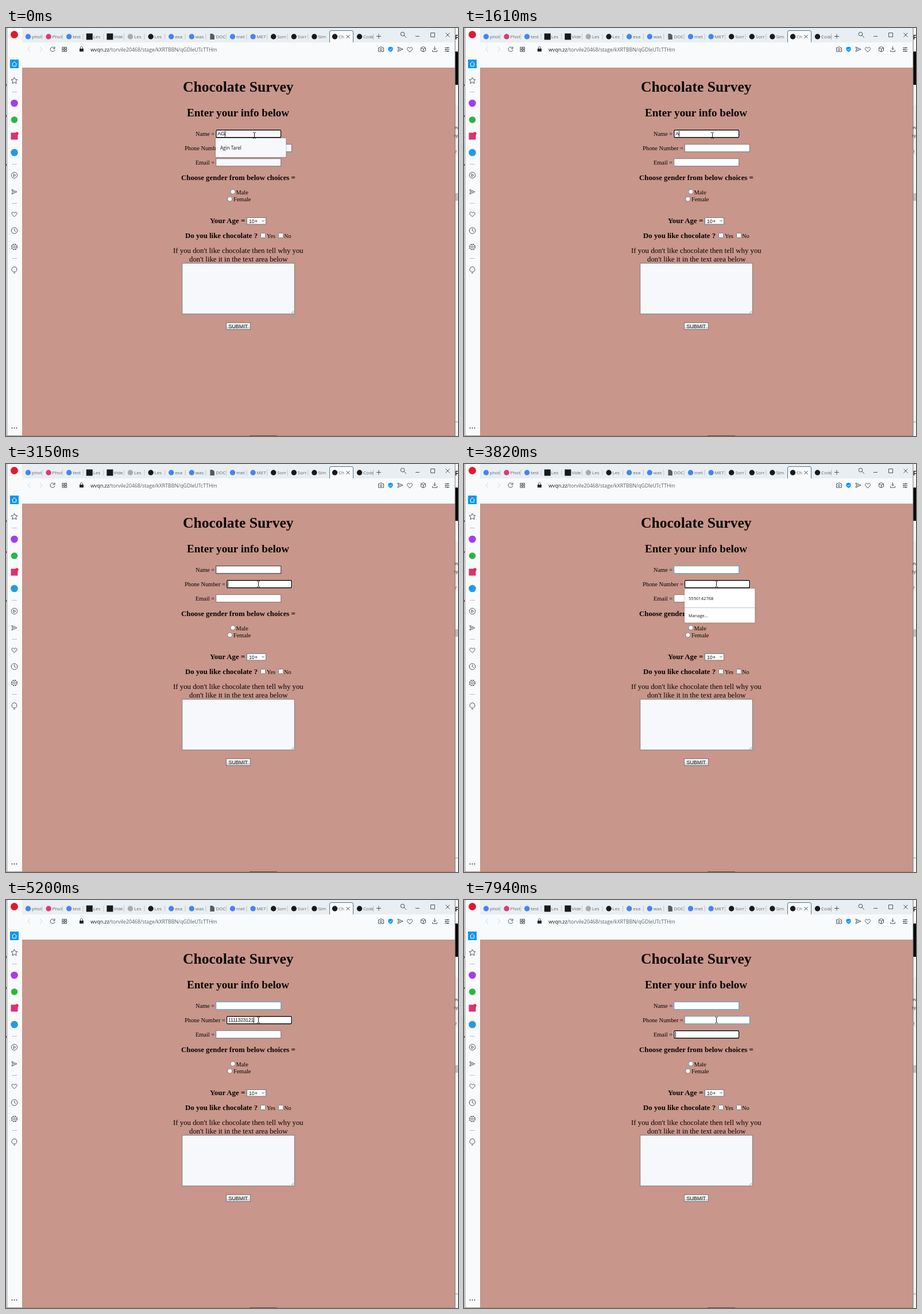
Recreate the animation shown at these times as an HTML page. Size 787x711 px, loop 8000 ms.

```html
<!DOCTYPE html>
<html lang="en">
<head>
<meta charset="utf-8">
<title>Chocolate Survey</title>
<style>
html, body { margin: 0; width: 100%; height: 100%; overflow: hidden; background: #fff; }
svg { display: block; }
text { white-space: pre; }
.serif { font-family: "Liberation Serif", serif; fill: #080404; }
.sans { font-family: "Liberation Sans", sans-serif; fill: #111; }
.ui { font-family: "Open Sans", sans-serif; fill: #181818; }
.line { fill: none; stroke: #4c5258; stroke-width: 1; }
.paper { fill: var(--paper); }
.popup { filter: drop-shadow(0 .5px 1px #0006); }
</style>
</head>
<body>
<svg id="stage" width="787" height="711" viewBox="0 0 787 711"></svg>
<script>
const stage = document.getElementById('stage');

const rect = (x, y, w, h, fill, more = '') =>
  `<rect x="${x}" y="${y}" width="${w}" height="${h}" fill="${fill}" ${more}/>`;
const dot = (x, y, r, fill, more = '') =>
  `<circle cx="${x}" cy="${y}" r="${r}" fill="${fill}" ${more}/>`;
const line = (d, more = '') => `<path class="line" d="${d}" ${more}/>`;
const text = (cls, size, x, y, str, more = '') =>
  `<text class="${cls}" font-size="${size}" x="${x}" y="${y}" ${more}>${str}</text>`;
const at = (x, y, body) => `<g transform="translate(${x} ${y})">${body}</g>`;

const heart = line('M0 4.5L-4 .3C-6 -3 -2 -5.5 0 -2.2C2 -5.5 6 -3 4 .3Z');
const send = line('M-4 -4L5 0L-4 4L-2.5 0ZM-2.5 0H1');

const fileIcon = (x, y) =>
  `<path d="M${x - 3.5} ${y - 5}h4.5l3 3v7h-7.5z" fill="#555b61"/>`;

function tabs() {
  const blue = '#4285f4', pink = '#d93a7c', black = '#17191b';
  const list = [
    ['phot', blue], ['Phot', pink], ['test', blue], ['Les', black, 1], ['Vide', black, 1],
    ['Les', '#aaa'], ['Les', black], ['exa', blue], ['was', blue], ['DOC', 0],
    ['met', blue], ['MET', blue], ['Sorr', black], ['Sorr', black], ['Sim', black],
    ['Ch', black], ['Code', black]
  ];
  let out = rect(28, 0, 753, 25, '#e9eef2') +
    '<path d="M563.5 25V7q0-2.5 2.5-2.5h36q2.5 0 2.5 2.5v18" fill="#f8fafc" stroke="#55748a"/>';
  list.forEach(([label, color, square], i) => {
    const x = i < 16 ? 38.5 + i * 35.6 : 615.5;
    const room = i == 15 ? 11 : 17;
    out += color === 0 ? fileIcon(x, 15)
      : square ? rect(x - 5.5, 9.5, 11, 11, color) : dot(x, 15, 4.7, color);
    out += `<svg x="${x + 6.5}" y="5" width="${room}" height="20">` +
      text('ui', 8, 0, 13, label, 'style="fill:#61686e"') + '</svg>';
    if (i < 14) out += line(`M${x + 24.5} 10V20`, 'style="stroke:#aeb6bc;stroke-width:.7"');
  });
  return out + line('M592.5 12l6 6m0-6l-6 6M645 14.5h8m-4-4v8') +
    line('M639.5 10v10', 'style="stroke:#aeb6bc"');
}

function chrome() {
  let out = rect(0, 0, 787, 711, '#fff') + rect(1.5, 0, 780.5, 711, '#f8fafc') + tabs();
  // window buttons
  out += line('M713 14.5h7M739.5 8.5h7v7h-7zM765.5 8.5l7 7m0-7l-7 7M693 13l4 4') +
    dot(690.5, 10.5, 3.3, 'none', 'class="line"') + dot(14.5, 11.5, 6.5, '#e5182d');
  // address bar
  out += line('M42 33l-4 4l4 4M59 33l4 4l-4 4', 'style="stroke:#cdd2d6"') +
    line('M84.5 35A4 4 0 1 0 85 38M85 32.5V36H81.5');
  for (const x of [98, 102.5]) for (const y of [33.5, 38])
    out += rect(x, y, 3, 3, 'none', 'class="line"');
  out += rect(128, 36, 7, 5, '#25282b') + line('M129.5 36v-2q2-3.5 4 0v2') +
    text('ui', 8.78, 147.3, 40.5,
      'wvqn.zz<tspan fill="#5a6066">/torvile20468/stage/kXRTBBN/qGDleUTcTTHm</tspan>');
  out += line('M648.5 34.5h2l1-1.5h3l1 1.5h2v6.5h-9z') + dot(653, 37.5, 1.8, 'none', 'class="line"') +
    '<path d="M665.5 34l4-1.5l4 1.5v4q-1 2.5-4 4q-3-1.5-4-4z" fill="#0a95f5"/>' +
    line('M667.5 37l1.7 1.7l2.8-3', 'style="stroke:#fff"') + at(686, 37, send) + at(703, 37.5, heart) +
    line('M726.5 32.5l4 2v5l-4 2l-4-2v-5zM722.5 34.5l4 2l4-2M726.5 36.5v5') +
    line('M746.5 32v6m-2.5-2.5l2.5 2.5l2.5-2.5M742.5 38.5v2.5h8v-2.5') +
    line('M764 34.5h8M764 37.5h8M764 40.5h8M769 33v3M766 36v3M769 39v3');
  // side bar
  out += rect(7, 55, 15, 15, '#0a95f5') +
    line('M10.5 62.5l4-4l4 4M11.5 62v4.5h6V62', 'style="stroke:#fff"') +
    line('M14.5 86l1.7 3.6l3.8.4l-2.8 2.6l.8 4l-3.5-2l-3.5 2l.8-4L9 90l3.8-.4z');
  for (const y of [111, 237, 305, 401])
    out += line(`M10 ${y}.5h9`, 'style="stroke:#b9c0c6"');
  out += dot(14.5, 131, 6.3, '#a33cf5') + dot(14.5, 160, 5.8, '#27b83f') +
    rect(8.5, 182.5, 12, 12, '#dc3176') + dot(19, 184, 2.7, '#fa2638') + dot(14.5, 217, 6.3, '#249ae8');
  out += dot(14.5, 256.5, 5.2, 'none', 'class="line"') + line('M13 254l4 2.5l-4 2.5z') +
    at(14, 285.5, send) + at(14.5, 324.5, heart) +
    dot(14.5, 353, 5.3, 'none', 'class="line"') + line('M14.5 349.5V353l2.5 2') +
    dot(14.5, 381.5, 1.8, 'none', 'class="line"') +
    dot(14.5, 381.5, 4.6, 'none', 'class="line" stroke-dasharray="2.4 1.2" style="stroke-width:1.8"') +
    line('M12.5 425q-3-2-2.5-5q1.2-4 4.5-4t4.5 4q.5 3-2.5 5zM13 427h3');
  for (const x of [10.5, 14.5, 18.5]) out += dot(x, 697, .9, '#333');
  return out;
}

function backdrop() {
  return rect(782, 0, 5, 711, '#f8f9fa') + rect(782, 41, 5, 58, '#050505') +
    rect(782, 134, 5, 88, '#eceef0') + rect(782, 288, 5, 13, '#bfc2c5') +
    text('sans', 10, 782, 20, 'Fe', 'font-weight="bold"') +
    text('ui', 7, 781, 176, 'ev') + text('ui', 7, 780, 190, 'sy') + text('ui', 7, 782, 218, '/') +
    rect(782, 686, 5, 1, '#999') + rect(1, 710, 781, 1, '#a58a84') + rect(424, 710, 48, 1, '#554845') +
    line('M1.5 0V711M782 0V711', 'style="stroke:#777"') +
    [98, 152, 237].map(y => rect(0, y, 1, 3, '#666')).join('');
}

function form() {
  const label = (x, y, str) => text('serif', 10.35, x, y, str);
  const bold = (size, x, y, str) => text('serif', size, x, y, str, 'font-weight="bold"');
  const box = (x, y, w, h, fill, more = '') =>
    rect(x, y, w, h, fill, 'stroke="#707078" stroke-width=".9" ' + more);
  return rect(28, 69, 754, 642, '#c8968a') +
    bold(25.6, 308, 111, 'Chocolate Survey') + bold(19.1, 315, 154, 'Enter your info below') +
    label(330, 188, 'Name =') + label(311, 212.5, 'Phone Number =') + label(330, 237.5, 'Email =') +
    bold(12.84, 305, 264.5, 'Choose gender from below choices =') +
    dot(395, 285.3, 4, '#fff', 'stroke="#707078" stroke-width=".8"') + label(400.5, 289.5, 'Male') +
    dot(389.8, 298, 4, '#fff', 'stroke="#707078" stroke-width=".8"') + label(396, 302, 'Female') +
    bold(12.84, 355, 340, 'Your Age =') + box(419.5, 330.5, 33, 11.5, '#fff') +
    text('sans', 8.75, 423, 339.5, '10+') + line('M445.5 335l2 2l2-2') +
    bold(12.84, 312, 366, 'Do you like chocolate ?') +
    box(443.5, 357.5, 8, 8, '#fff', 'rx="1"') + label(454, 366, 'Yes') +
    box(474.5, 357.5, 8, 8, '#fff', 'rx="1"') + label(484, 366, 'No') +
    text('serif', 12.84, 291, 392, "If you don't like chocolate then tell why you") +
    text('serif', 12.84, 319, 407, "don't like it in the text area below") +
    box(306.8, 410, 195.5, 88.2, '#f7f8fb') + line('M497 497l4-4M499.5 497l1.5-1.5', 'style="stroke:#999"') +
    box(383.5, 513.5, 42, 12, '#efeff0') + rect(384, 521, 41, 4, '#d4d5d8') +
    text('sans', 8.9, 387.5, 522.7, 'SUBMIT');
}

const field = (id, x, y, size, spacing) => `<g id="${id}">` +
  rect(x - 1.3, y - 1, 115.6, 14.9, '#fff', 'rx="2" class="halo"') +
  rect(x, y, 113, 13, '#fff', 'class="frame paper"') +
  text('sans', size, x + 2.6, y + 9.7, '', `letter-spacing="${spacing}"`) +
  rect(x, y + 1.7, 1, 10, '#111', 'class="caret"') + '</g>';

const popup = (id, x, y, h, body) => `<g id="${id}">` +
  rect(x, y, 122.5, h, '#fff', 'rx="1.5" class="popup paper"') + body + '</g>';

stage.innerHTML = chrome() + form() + backdrop() +
  field('name', 365.7, 177.7, 9.1, 0) + field('phone', 384.4, 202.7, 8.75, -.25) +
  field('email', 365.7, 227.7, 8.75, 0) +
  popup('oneName', 365, 192, 33, text('ui', 8.1, 373, 211.7, 'Agin Tarel')) +
  popup('twoNames', 365, 192, 57,
    text('ui', 8.1, 373, 211.7, 'Agin Tarel') + text('ui', 8.1, 373, 235.7, 'Agin')) +
  popup('numbers', 384, 217, 59.5, text('ui', 7.6, 391, 236.5, '5550142768') +
    rect(384, 250, 122.5, .8, '#aeb1b4') + text('ui', 7.4, 391, 266.5, 'Manage...')) +
  '<g id="pointer">' + line('M-2.5 -5H-.7M.7 -5H2.5M0 -4.5V4.5M-2.5 5H-.7M.7 5H2.5',
    'style="stroke:#111"') + '</g>';

const $ = id => document.getElementById(id);
const between = (t, a, b) => t >= a && t < b;
const show = (node, on) => node.setAttribute('visibility', on ? 'visible' : 'hidden');

function setField(id, value, focused, caretOn, border) {
  const g = $(id), frame = g.querySelector('.frame');
  const label = g.querySelector('text'), caret = g.querySelector('.caret');
  frame.setAttribute('stroke', focused ? '#050505' : border);
  frame.setAttribute('stroke-width', focused ? 1.5 : 1);
  frame.setAttribute('rx', focused ? 1.5 : 0);
  show(g.querySelector('.halo'), focused);
  label.textContent = value;
  const start = +label.getAttribute('x');
  caret.setAttribute('x', Math.floor(start + (value ? label.getComputedTextLength() : -.3)));
  show(caret, focused && caretOn);
}

const nameKeys = [[0, 2], [180, 3], [300, 4], [1100, 3], [1280, 2], [1460, 1], [1640, 0]];
const phoneKeys = [3910, 4100, 4250, 4370, 4600, 4750, 5020, 5080, 5140, 5200, 5260, 5350];

function digits(t) {
  if (t >= 6210) return Math.max(0, 10 - Math.floor((t - 6210) / 34));
  if (t >= 5690) return 11;
  return phoneKeys.filter(k => k <= t).length;
}

const mix = (a, b, k) => 'rgb(' + a.map((v, i) => Math.round(v + (b[i] - v) * k)) + ')';
const clamp = k => Math.min(1, Math.max(0, k));

function draw(t) {
  const toPhone = 3120, toEmail = 6860, grey = '#767680', blue = [66, 165, 216];
  const letters = nameKeys.filter(([k]) => k <= t).pop()[1];
  const nameBorder = mix([45, 50, 65], blue, clamp((t - 3150) / 90));
  stage.style.setProperty('--paper', t < 1460 ? '#f7f8fb' : '#fff');
  setField('name', 'AGIN'.slice(0, letters), t < toPhone,
    !between(t, 950, 1460) && !between(t, 1980, 2510), nameBorder);
  setField('phone', '111132312131'.slice(0, digits(t)), between(t, toPhone, toEmail),
    !between(t, 3670, 3910) && !between(t, 5870, 6240), t < toPhone ? grey : `rgb(${blue})`);
  setField('email', '', t >= toEmail, !between(t, 7410, 7940), grey);
  show($('oneName'), t < 1460);
  show($('twoNames'), between(t, 1460, 1610));
  show($('numbers'), between(t, 3210, 3910));
  const k = clamp((t - 2850) / 240);
  $('pointer').setAttribute('transform', `translate(${432.5 + 7 * k} ${187 + 22 * k})`);
}

const begin = performance.now();
function tick() {
  draw((performance.now() - begin) % 8000);
  requestAnimationFrame(tick);
}
tick();
</script>
</body>
</html>
```
